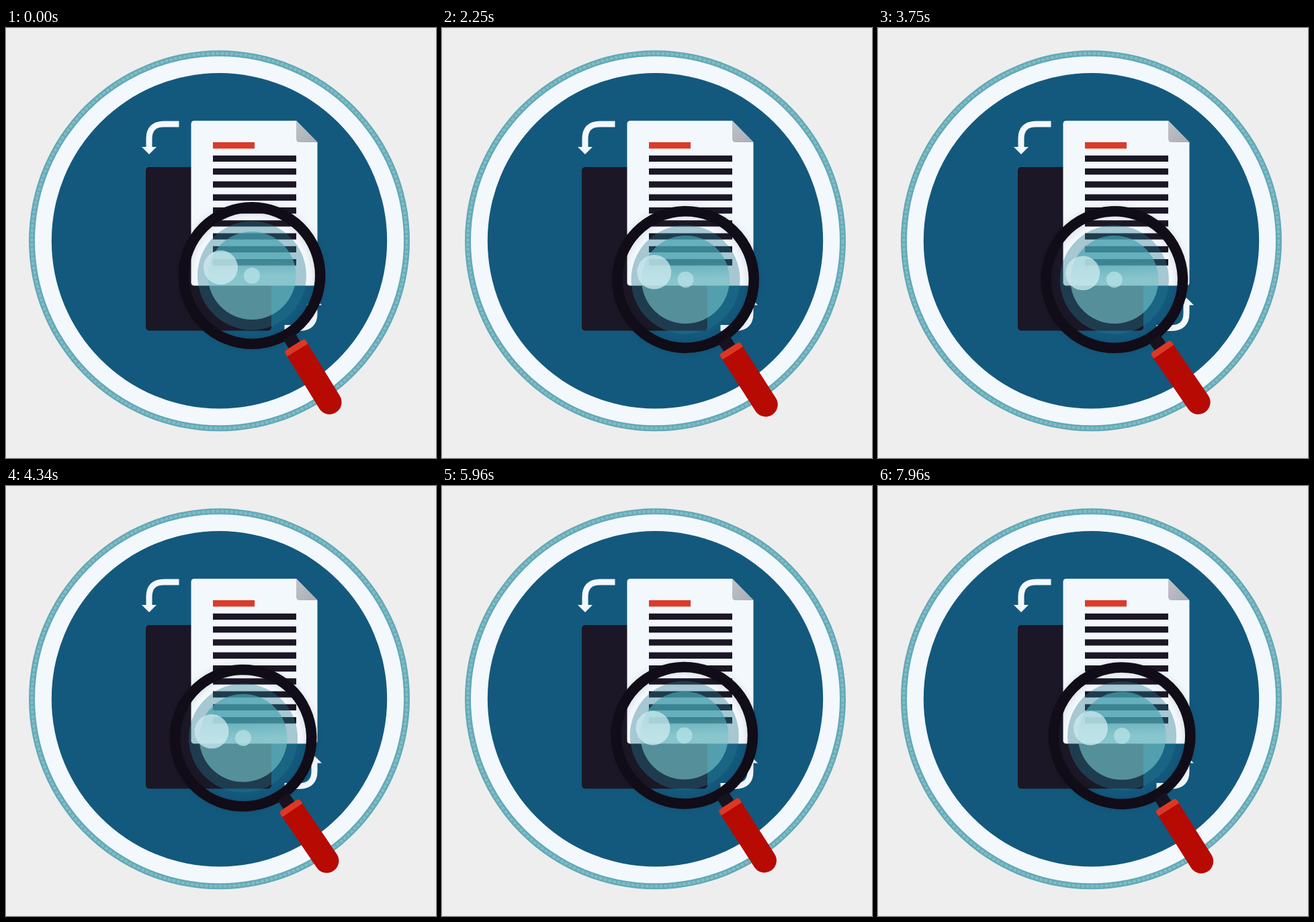
These frames come from a looping animation (640 px wide and 640 px high, 8000 ms). An HTML page:

```html
<!DOCTYPE html>
<html lang="en">
<head>
<meta charset="utf-8">
<title>Document search</title>
<style>
  html, body { margin: 0; width: 100%; height: 100%; overflow: hidden; background: #eee; }
  svg { display: block; width: 100vw; height: 100vh; }
</style>
</head>
<body>
<svg viewBox="0 0 640 640">
  <defs>
    <linearGradient id="glass" x2="0" y2="1">
      <stop offset=".3" stop-color="#48a4b2" stop-opacity=".68"/>
      <stop offset=".5" stop-color="#76c3c8" stop-opacity=".62"/>
    </linearGradient>
    <linearGradient id="fold" x2="1" y2="1">
      <stop offset="0" stop-color="#c0c3c8"/>
      <stop offset="1" stop-color="#a9acb4"/>
    </linearGradient>
    <filter id="soft" x="-20%" y="-20%" width="140%" height="140%"><feGaussianBlur stdDeviation="5"/></filter>
    <g id="arrow">
      <path d="M257.500 143H235Q213 143 213 165V178" fill="none" stroke="#f3f8fd" stroke-width="9"/>
      <path d="M202 177H224L213 188Z" fill="#f3f8fd"/>
    </g>
  </defs>

  <g transform="translate(317.500 316.800)">
    <circle r="283.500" fill="#63a9b6"/>
    <circle r="279" fill="none" stroke="#80bcc7" stroke-width="4" stroke-dasharray="5 2"/>
    <circle r="274.500" fill="#f3f8fd"/>
    <circle r="249.700" fill="#13597d"/>
  </g>

  <use href="#arrow"/>
  <use href="#arrow" transform="rotate(180 336 294.700)"/>
  <rect x="208" y="207" width="187" height="243.500" rx="5" fill="#1b1726"/>
  <path d="M280.500 138H432L463.500 170V378.500Q463.500 383.500 458.500 383.500H280.500Q275.500 383.500 275.500 378.500V143Q275.500 138 280.500 138Z" fill="#f3f8fd"/>
  <path d="M432 138L463.500 170H437Q432 170 432 165Z" fill="url(#fold)"/>
  <rect x="308" y="170" width="62" height="9.500" fill="#dc3a2a"/>
  <!-- Nine evenly spaced lines of text -->
  <path d="M370 189.700V354" fill="none" stroke="#1b1726" stroke-width="124" stroke-dasharray="9.300 10"/>

  <g id="magnifier">
    <circle r="101" fill="none" stroke="#0a0714" stroke-opacity=".1" stroke-width="18" filter="url(#soft)"/>
    <circle r="81" fill="#267a8f" fill-opacity=".38"/>
    <circle r="65.500" fill="url(#glass)"/>
    <circle cx="-46.500" cy="-12" r="25.500" fill="#d2edf2" fill-opacity=".72"/>
    <circle r="12" fill="#b4e0e6" fill-opacity=".8"/>
    <circle r="101.700" fill="none" stroke="#100c18" stroke-width="15.500"/>
    <g transform="rotate(58.500)">
      <rect x="106" y="-10" width="18" height="20" fill="#17121f"/>
      <path d="M125 -18H221A18 18 0 0 1 221 18H125Q121 18 121 14V-14Q121 -18 125 -18Z" fill="#b60a03"/>
      <path d="M130 -18H125Q121 -18 121 -14V14Q121 18 125 18H130Z" fill="#dc3925"/>
    </g>
  </g>
</svg>
<script>
  const LOOP = 8000, STEP = 1000;
  // Lens centre at every step; the drift is cut hard at the loop end
  const path = [
    [366, 368.5], [369, 371], [365, 374], [354, 375], [352, 374.5],
    [356.5, 376], [361, 371], [368.5, 363.5], [363, 372]
  ];

  const point = i => path[Math.max(0, Math.min(i, path.length - 1))];

  // Catmull-Rom curve through the path
  function lensAt(time) {
    const i = Math.floor(time / STEP), u = time / STEP - i;
    return [0, 1].map(k => {
      const [a, b, c, d] = [-1, 0, 1, 2].map(n => point(i + n)[k]);
      return b + u / 2 * (c - a + u * (2 * a - 5 * b + 4 * c - d + u * (3 * (b - c) + d - a)));
    });
  }

  const magnifier = document.getElementById('magnifier');
  const start = performance.now();

  function draw(now) {
    const [x, y] = lensAt(Math.max(0, now - start) % LOOP);
    // The hand swings the lens about the far end of the handle
    const tilt = 0.16 * (x - 366) - 0.1 * (y - 368.5);
    magnifier.setAttribute('transform', `translate(${x} ${y}) rotate(${tilt})`);
    requestAnimationFrame(draw);
  }
  draw(start);
</script>
</body>
</html>
```
